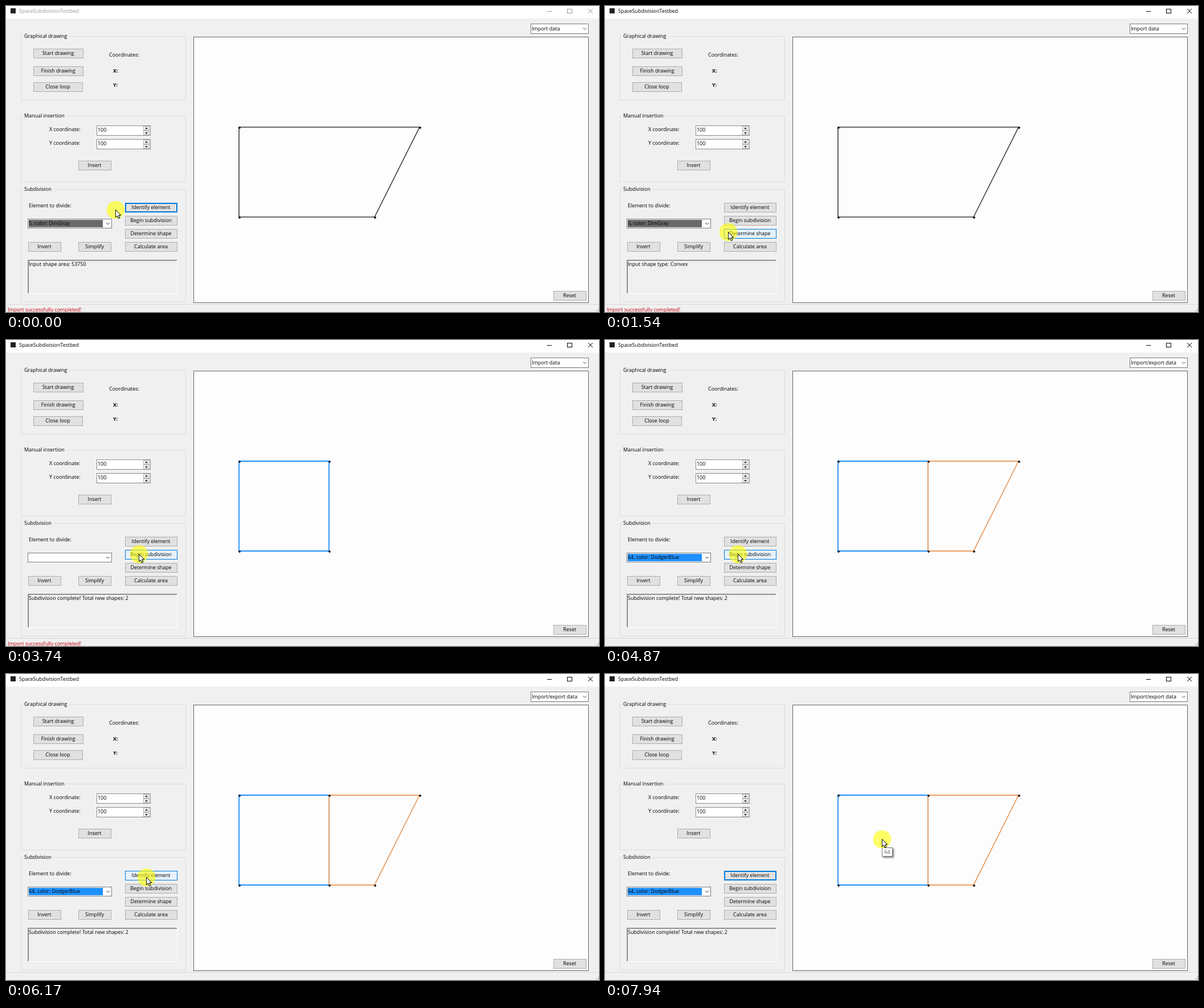
Write an HTML page with a canvas that moves like this. It is 1041 by 538 pixels and loops after 8 s.

```html
<!DOCTYPE html>
<html lang="en">
<head>
<meta charset="utf-8">
<title>SpaceSubdivisionTestbed</title>
<style>
html, body { margin: 0; width: 100%; height: 100%; overflow: hidden; background: #f0f0f0; }
canvas { display: block; }
</style>
</head>
<body>
<canvas id="stage" width="1041" height="538"></canvas>
<script>
const ctx = document.getElementById('stage').getContext('2d');
const LOOP = 8000;
const BLUE = '#0078d7', FACE = '#f0f0f0';
const BUTTON_HEIGHT = 17;

// label: x, y, width
const buttons = {
  'Start drawing': [48, 75, 88],
  'Finish drawing': [48, 106, 88],
  'Close loop': [48, 134, 87],
  'Insert': [127, 272, 58],
  'Identify element': [209, 346, 92],
  'Begin subdivision': [209, 369, 92],
  'Determine shape': [209, 392, 92],
  'Calculate area': [209, 415, 92],
  'Invert': [39, 415, 58],
  'Simplify': [127, 415, 58],
  'Reset': [961, 501, 58]
};

const clicks = [
  { name: 'Determine shape', down: 1040, up: 1140 },
  { name: 'Begin subdivision', down: 3100, up: 3170 },
  { name: 'Identify element', down: 5600, up: 5670 }
];

// start, end, target x, target y
const moves = [
  [140, 800, 216, 397],
  [2170, 2470, 230, 381],
  [2670, 2770, 233, 376],
  [5200, 5440, 246, 357],
  [6170, 6800, 486, 290]
];

function pointerAt(t) {
  let x = 192, y = 358;
  for (const [start, end, tx, ty] of moves) {
    const p = Math.min(1, Math.max(0, (t - start) / (end - start)));
    const e = p * p * (3 - 2 * p);
    x += (tx - x) * e;
    y += (ty - y) * e;
  }
  return [x, y];
}

function rect(x, y, w, h, color) {
  ctx.fillStyle = color;
  ctx.fillRect(x, y, w, h);
}

function box(x, y, w, h, fill, border, line = 1) {
  rect(x, y, w, h, border);
  rect(x + line, y + line, w - 2 * line, h - 2 * line, fill);
}

function setFont(weight = 400) {
  ctx.font = `${weight} 8.95px "Open Sans", "Noto Sans", sans-serif`;
}

function text(str, x, y, { color = '#000', align = 'left', weight = 400 } = {}) {
  setFont(weight);
  ctx.textAlign = align;
  ctx.fillStyle = color;
  ctx.fillText(str, x, y + 3);
}

function path(points, color, width = 1, closed = false) {
  ctx.beginPath();
  points.forEach(([x, y]) => ctx.lineTo(x, y));
  if (closed) ctx.closePath();
  ctx.strokeStyle = color;
  ctx.lineWidth = width;
  ctx.stroke();
}

function group(label, y, h) {
  box(26, y, 290, h, FACE, '#dcdcdc');
  setFont();
  rect(30, y - 2, ctx.measureText(label).width + 4, 5, FACE);
  text(label, 32, y);
}

function combo(x, y, w, h, label, selection) {
  box(x, y, w, h, '#fff', '#7a7a7a');
  if (selection) rect(x + 2, y + 2, w - 18, h - 4, selection);
  const cx = x + w - 7, cy = y + h / 2;
  text(label, x + 2, Math.floor(cy));
  path([[cx - 3, cy - 1.5], [cx, cy + 1.5], [cx + 3, cy - 1.5]], '#444');
}

function triangle(x, y, dir) {
  ctx.beginPath();
  ctx.moveTo(x - 2.5, y + dir);
  ctx.lineTo(x + 2.5, y + dir);
  ctx.lineTo(x, y - 2 * dir);
  ctx.fillStyle = '#222';
  ctx.fill();
}

function spinner(y) {
  box(159, y, 95, 18, '#fff', '#8a8a8a');
  text('100', 161, y + 8);
  for (const [dy, dir] of [[1, 1], [9, -1]]) {
    box(241, y + dy, 11, 8, FACE, '#b4b4b4');
    triangle(246.5, y + dy + 4.3, dir);
  }
}

function button(label, hover, pressed, focused) {
  const [x, y, w] = buttons[label], h = BUTTON_HEIGHT;
  if (pressed) box(x, y, w, h, '#cce4f7', '#005499');
  else if (hover) box(x, y, w, h, '#e5f1fb', BLUE);
  else if (focused) box(x, y, w, h, '#e1e1e1', BLUE, 2);
  else box(x, y, w, h, '#e1e1e1', '#adadad');
  text(label, x + w / 2 - .5, y + 8, { align: 'center' });
}

function titleBar(active) {
  const color = active ? '#000' : '#999';
  rect(0, 0, 1041, 22, '#fff');
  rect(8, 4, 9, 9, '#222');
  text('SpaceSubdivisionTestbed', 23, 9, { color });
  rect(950, 9, 8, 1, color);
  box(985, 5, 9, 8, '#fff', color);
  path([[1022, 5], [1030, 13]], color);
  path([[1030, 5], [1022, 13]], color);
}

function dot([x, y]) {
  ctx.beginPath();
  for (const [dx, dy] of [[0, -2.3], [2.3, 0], [0, 2.3], [-2.3, 0]]) ctx.lineTo(x + 1 + dx, y + 1 + dy);
  ctx.fillStyle = '#000';
  ctx.fill();
}

function shapes(t) {
  const a = [409, 213], b = [567, 213], c = [726, 213];
  const d = [647, 371], e = [567, 371], f = [409, 371];
  let corners = [a, c, d, f];
  if (t < 3670) {
    path(corners, '#3c3c3c', 1.6, true);
  } else {
    path([a, b, e, f], '#1e90ff', 1.8, true);
    corners = [a, b, e, f];
    if (t >= 3800) {
      path([b, c, d, e], '#eda066', 1.8, true);
      corners.push(c, d);
    }
  }
  corners.forEach(dot);
}

function tooltip(t) {
  if (t < 7100) return;
  ctx.save();
  ctx.globalAlpha = Math.min(1, (t - 7070) / 120);
  ctx.save();
  ctx.shadowColor = 'rgba(0,0,0,.5)';
  ctx.shadowBlur = 3;
  ctx.shadowOffsetX = ctx.shadowOffsetY = 2;
  rect(486, 305, 19, 16, '#767676');
  ctx.restore();
  rect(487, 306, 17, 14, '#fff');
  text('64', 490.5, 313, { color: '#575757' });
  ctx.restore();
}

function pointer(x, y) {
  ctx.beginPath();
  ctx.arc(x + .5, y + .5, 15.8, 0, 2 * Math.PI);
  ctx.fillStyle = 'rgba(255,255,0,.6)';
  ctx.fill();
  const arrow = [[0, 0], [0, 13], [3, 10.3], [5, 15], [7.2, 14], [5.2, 9.5], [9, 9.3]]
    .map(([dx, dy]) => [x + .5 + dx, y + .5 + dy]);
  path(arrow, '#000', 1, true);
  ctx.fillStyle = '#fff';
  ctx.fill();
  path(arrow, '#000', .9, true);
}

function draw(t) {
  const [px, py] = pointerAt(t);
  const done = t >= 3900;
  const last = clicks.filter(c => t >= c.down).pop();
  const focus = last ? last.name : 'Identify element';

  rect(0, 0, 1041, 538, FACE);
  titleBar(t >= 1040);
  group('Graphical drawing', 53, 113);
  group('Manual insertion', 193, 117);
  group('Subdivision', 322, 199);

  text('Coordinates:', 181, 86);
  text('X:', 188, 114, { weight: 700 });
  text('Y:', 188, 139, { weight: 700 });
  text('X coordinate:', 76, 217);
  text('Y coordinate:', 76, 241);
  spinner(210);
  spinner(234);
  text('Element to divide:', 40, 351);

  if (t < 3670) combo(38, 374, 148, 17, '5, color: DimGray', '#696969');
  else if (done) combo(38, 374, 148, 17, '64, color: DodgerBlue', '#1e90ff');
  else combo(38, 374, 148, 17, '');
  combo(921, 31, 102, 18, done ? 'Import/export data' : 'Import data');

  rect(38, 446, 263, 60, '#fff');
  rect(38, 446, 262, 59, '#a0a0a0');
  rect(39, 447, 261, 58, '#808080');
  rect(40, 448, 260, 57, FACE);
  text(t < 1140 ? 'Input shape area: 53750'
    : t < 3670 ? 'Input shape type: Convex'
    : 'Subdivision complete! Total new shapes: 2', 40, 454);

  box(329, 54, 694, 468, '#fdfdfd', '#646464');
  shapes(t);

  for (const label in buttons) {
    const [x, y, w] = buttons[label];
    const hover = px >= x && px < x + w && py >= y && py < y + BUTTON_HEIGHT;
    const pressed = last && last.name === label && t < last.up;
    button(label, hover, pressed, label === focus);
  }

  rect(0, 524, 1041, 1, '#d7d7d7');
  if (!done) text('Import successfully completed!', 3, 534, { color: '#c4000c' });
  for (const [x, y] of [[1039, 532], [1039, 535], [1036, 535]]) rect(x, y, 1.5, 1.5, '#999');

  tooltip(t);
  pointer(px, py);
}

function frame() {
  draw(performance.now() % LOOP);
  requestAnimationFrame(frame);
}
frame();
</script>
</body>
</html>
```
